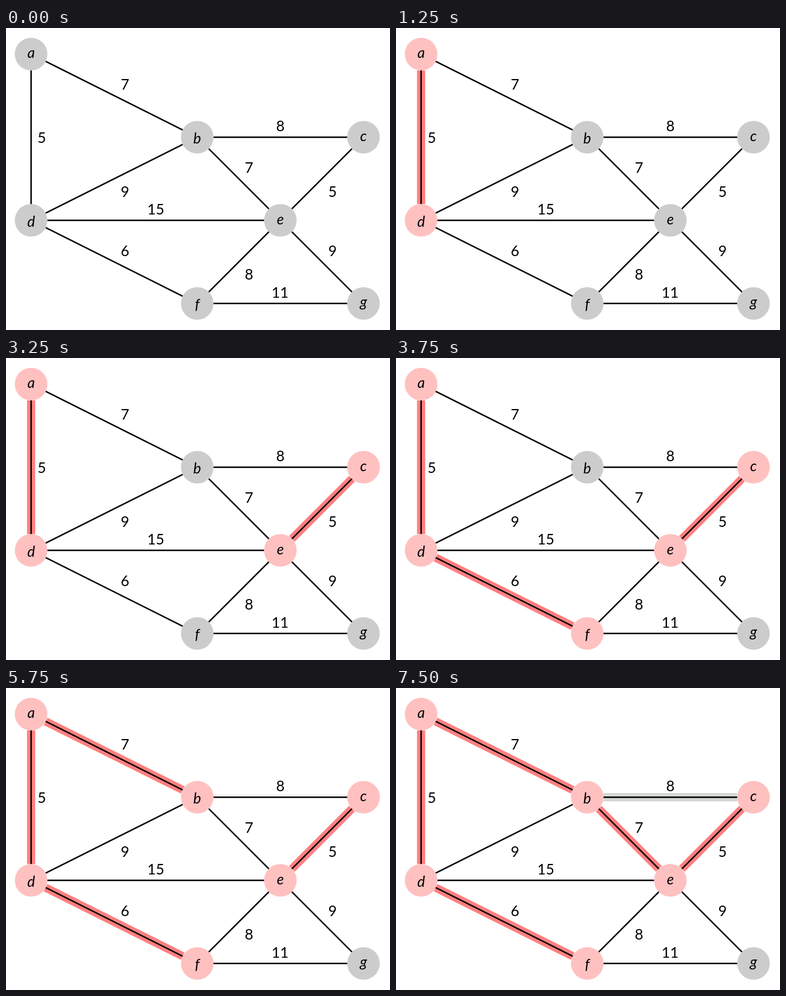
An HTML page that plays this animation: 655x515 px, repeating every 8000 ms.

```html
<!DOCTYPE html>
<html lang="en">
<head>
<meta charset="utf-8">
<title>Minimum spanning tree</title>
<style>
  html, body { margin: 0; width: 100%; height: 100%; overflow: hidden; background: #fff; }
  svg { display: block; width: 655px; height: 515px; }
  text { font: 25px Lato, "Open Sans", sans-serif; text-anchor: middle; fill: #000; }
  .node text { font-style: italic; }
  .edge { stroke: #000; stroke-width: 2.5; }
  .mark { stroke-width: 14; visibility: hidden; }
</style>
</head>
<body>
<svg viewBox="0 0 655 515"></svg>
<script>
const LOOP = 8000, STEP = 1250, RADIUS = 27.8;
const GREY = '#cccccc', PINK = '#ffc0c0', RED = '#ff8080', REJECTED = '#d3d7cf';

// name: x, y, text baseline
const nodes = {
  a: [42.8, 44.5, 51], b: [326.2, 186.2, 197], c: [609.8, 186.2, 193],
  d: [42.8, 328, 338.5], e: [468, 328, 335], f: [326.2, 469.7, 479.5],
  g: [609.8, 469.7, 476]
};

// ends, weight, label x, label baseline
const edges = [
  ['ab', 7, 203, 104.5], ['ad', 5, 61, 195.5], ['bc', 8, 468, 176],
  ['bd', 9, 203, 288], ['be', 7, 414.5, 246.5], ['ce', 5, 557, 288],
  ['de', 15, 255.5, 318], ['df', 6, 203, 389], ['ef', 8, 414.5, 429],
  ['eg', 9, 557, 389], ['fg', 11, 467.5, 459.5]
];

// one edge is examined per step
const picks = ['ad', 'ce', 'df', 'ab', 'be', 'bc'];
const rejected = ['bc'];

const svg = document.querySelector('svg');
const discs = {}, marks = {};

function add(parent, tag, attrs, text) {
  const el = document.createElementNS('http://www.w3.org/2000/svg', tag);
  for (const key in attrs) el.setAttribute(key, attrs[key]);
  if (text !== undefined) el.textContent = text;
  return parent.appendChild(el);
}

// the visible part of an edge, from rim to rim
function span([from, to]) {
  const [x1, y1] = nodes[from], [x2, y2] = nodes[to];
  const k = RADIUS / Math.hypot(x2 - x1, y2 - y1);
  const dx = (x2 - x1) * k, dy = (y2 - y1) * k;
  return { x1: x1 + dx, y1: y1 + dy, x2: x2 - dx, y2: y2 - dy };
}

for (const id of picks) {
  const stroke = rejected.includes(id) ? REJECTED : RED;
  marks[id] = add(svg, 'line', { class: 'mark', stroke, ...span(id) });
}
for (const name in nodes) {
  const [cx, cy, base] = nodes[name];
  const group = add(svg, 'g', { class: 'node' });
  discs[name] = add(group, 'circle', { cx, cy, r: RADIUS, fill: GREY });
  add(group, 'text', { x: cx, y: base }, name);
}
for (const [id, weight, x, y] of edges) {
  add(svg, 'line', { class: 'edge', ...span(id) });
  add(svg, 'text', { x, y }, weight);
}

function show(step) {
  const seen = picks.slice(0, step);
  const joined = seen.filter(id => !rejected.includes(id)).join('');
  for (const id of picks) marks[id].style.visibility = seen.includes(id) ? 'visible' : 'hidden';
  for (const name in discs) discs[name].setAttribute('fill', joined.includes(name) ? PINK : GREY);
}

const start = performance.now();
let current = -1;
function tick() {
  const time = (performance.now() - start) % LOOP;
  const step = Math.floor(time / STEP);
  if (step !== current) show(current = step);
  requestAnimationFrame(tick);
}
tick();
</script>
</body>
</html>
```
